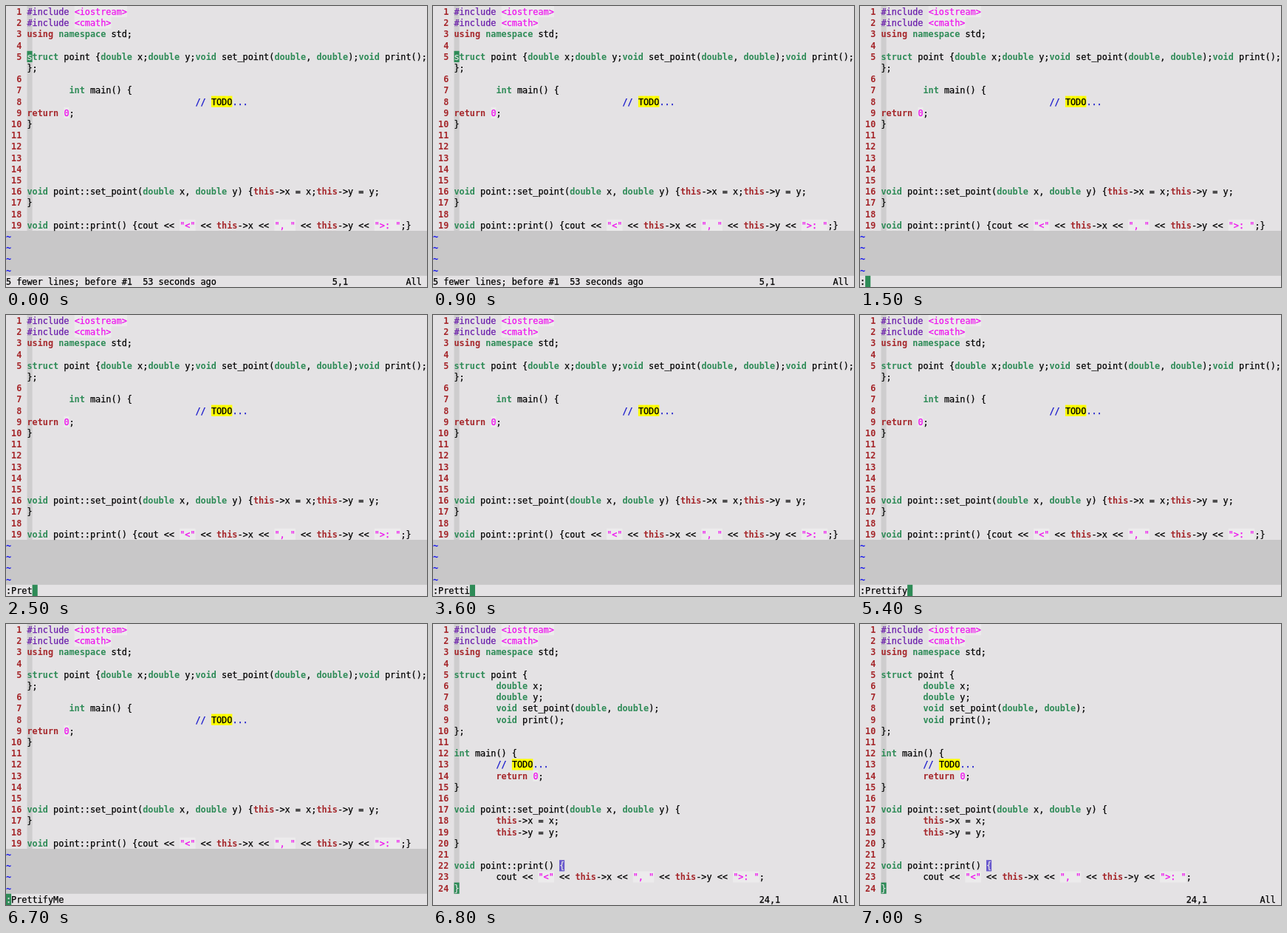
These frames come from a looping animation (570 px wide and 380 px high, 8 s). An HTML page:

```html
<!DOCTYPE html>
<html lang="en">
<head>
<meta charset="utf-8">
<style>
  html, body { margin: 0; width: 100%; height: 100%; overflow: hidden; background: #e4e2e4; }
  svg { display: block; width: 570px; height: 380px; }
  text {
    font: 11.835px "DejaVu Sans Mono", monospace;
    white-space: pre;
    fill: #000;
    stroke: #000;
    stroke-width: .25px;
  }
  .type, .statement, .number, .tilde { font-weight: bold; stroke: none; }
  .type { fill: #2e8b57; }
  .statement, .number { fill: #a5262a; }
  .tilde { fill: #1010f0; }
  .include { fill: #6a1cab; stroke: #6a1cab; }
  .constant { fill: #ee10ee; stroke: #ee10ee; }
  .comment { fill: #1515cc; stroke: #1515cc; }
  .inverse { fill: #e4e2e4; stroke: #e4e2e4; }
</style>
</head>
<body>
<svg id="stage" viewBox="0 0 570 380"></svg>
<script>
const LOOP = 8000, COL = 570 / 80, ROW = 380 / 25, GUTTER = 4;
const GREEN = '#2e8b57';
const stage = document.getElementById('stage');

const messy = `#include <iostream>
#include <cmath>
using namespace std;

struct point {double x;double y;void set_point(double, double);void print();};

        int main() {
                                // TODO...
return 0;
}





void point::set_point(double x, double y) {this->x = x;this->y = y;
}

void point::print() {cout << "<" << this->x << ", " << this->y << ">: ";}`;

const pretty = `#include <iostream>
#include <cmath>
using namespace std;

struct point {
        double x;
        double y;
        void set_point(double, double);
        void print();
};

int main() {
        // TODO...
        return 0;
}

void point::set_point(double x, double y) {
        this->x = x;
        this->y = y;
}

void point::print() {
        cout << "<" << this->x << ", " << this->y << ">: ";
}`;

const syntax = new RegExp([
  '(?<constant>"[^"]*"|<\\w+>|\\b0\\b)',
  '(?<include>#include)',
  '(?<todo>TODO)',
  '(?<comment>\\/\\/|\\.{3})',
  '(?<type>\\b(?:struct|double|void|int|namespace)\\b)',
  '(?<statement>\\b(?:using|this|return)\\b)'
].join('|'), 'g');

// Command line contents by the time they appear.
const typing = [[1000, ':'], [2000, ':P'], [2300, ':Pre'], [2500, ':Pret'],
  [3100, ':Prett'], [3600, ':Pretti'], [4000, ':Prettif'], [4700, ':Prettify'],
  [5600, ':PrettifyM'], [5700, ':PrettifyMe']];
const ENTER = 6700, FORMATTED = 6800;

const escape = s => s.replace(/&/g, '&amp;').replace(/</g, '&lt;').replace(/>/g, '&gt;');

function box(col, row, cols, rows, fill) {
  return `<rect x="${col * COL}" y="${row * ROW}" width="${cols * COL}" height="${rows * ROW}" fill="${fill}"/>`;
}

function put(col, row, string, kind = '') {
  if (!string.trim()) return '';
  return `<text class="${kind}" x="${col * COL}" y="${row * ROW + 12}">${escape(string)}</text>`;
}

function block(col, row, char = '', fill = GREEN) {
  return box(col, row, 1, 1, fill) + put(col, row, char, 'inverse');
}

function codeLine(line, row) {
  let out = '', end = 0;
  for (const match of line.matchAll(syntax)) {
    const kind = Object.keys(match.groups).find(name => match.groups[name]);
    const col = GUTTER + match.index, string = match[0];
    out += put(GUTTER + end, row, line.slice(end, match.index));
    if (kind === 'todo') out += box(col, row, string.length, 1, '#ffff00');
    if (kind === 'constant') out += box(col, row, string.length, 1, '#ecebec');
    out += put(col, row, string, kind);
    end = match.index + string.length;
  }
  return out + put(GUTTER + end, row, line.slice(end));
}

function editor(source) {
  let out = '', row = 0;
  source.split('\n').forEach((line, i) => {
    out += put(0, row, String(i + 1).padStart(3), 'number');
    const width = 80 - GUTTER;
    for (let start = 0; start === 0 || start < line.length; start += width) {
      out += codeLine(line.slice(start, start + width), row++);
    }
  });
  let back = box(0, 0, 80, 25, '#e4e2e4') + box(GUTTER, 0, 1, row, '#cecdce');
  if (row < 24) back += box(0, row, 80, 24 - row, '#c8c7c8');
  for (; row < 24; row++) out += put(0, row, '~', 'tilde');
  return back + out;
}

const messyView = editor(messy), prettyView = editor(pretty);
const ruler = position => put(62, 24, position) + put(76, 24, 'All');

function picture(t) {
  if (t >= FORMATTED) {
    return prettyView + ruler('24,1') +
      block(24, 21, '{', '#6a5acd') + block(GUTTER, 23, '}');
  }
  const typed = typing.filter(([start]) => t >= start).pop();
  if (!typed) {
    return messyView + put(0, 24, '5 fewer lines; before #1  53 seconds ago') +
      ruler('5,1') + block(GUTTER, 4, 's');
  }
  const command = typed[1];
  const cursor = t >= ENTER ? block(0, 24, ':') : block(command.length, 24);
  return messyView + put(0, 24, command) + cursor;
}

let shown = '';
const origin = performance.now();
function update() {
  const next = picture((performance.now() - origin) % LOOP);
  if (next !== shown) stage.innerHTML = shown = next;
  requestAnimationFrame(update);
}
update();
</script>
</body>
</html>
```
